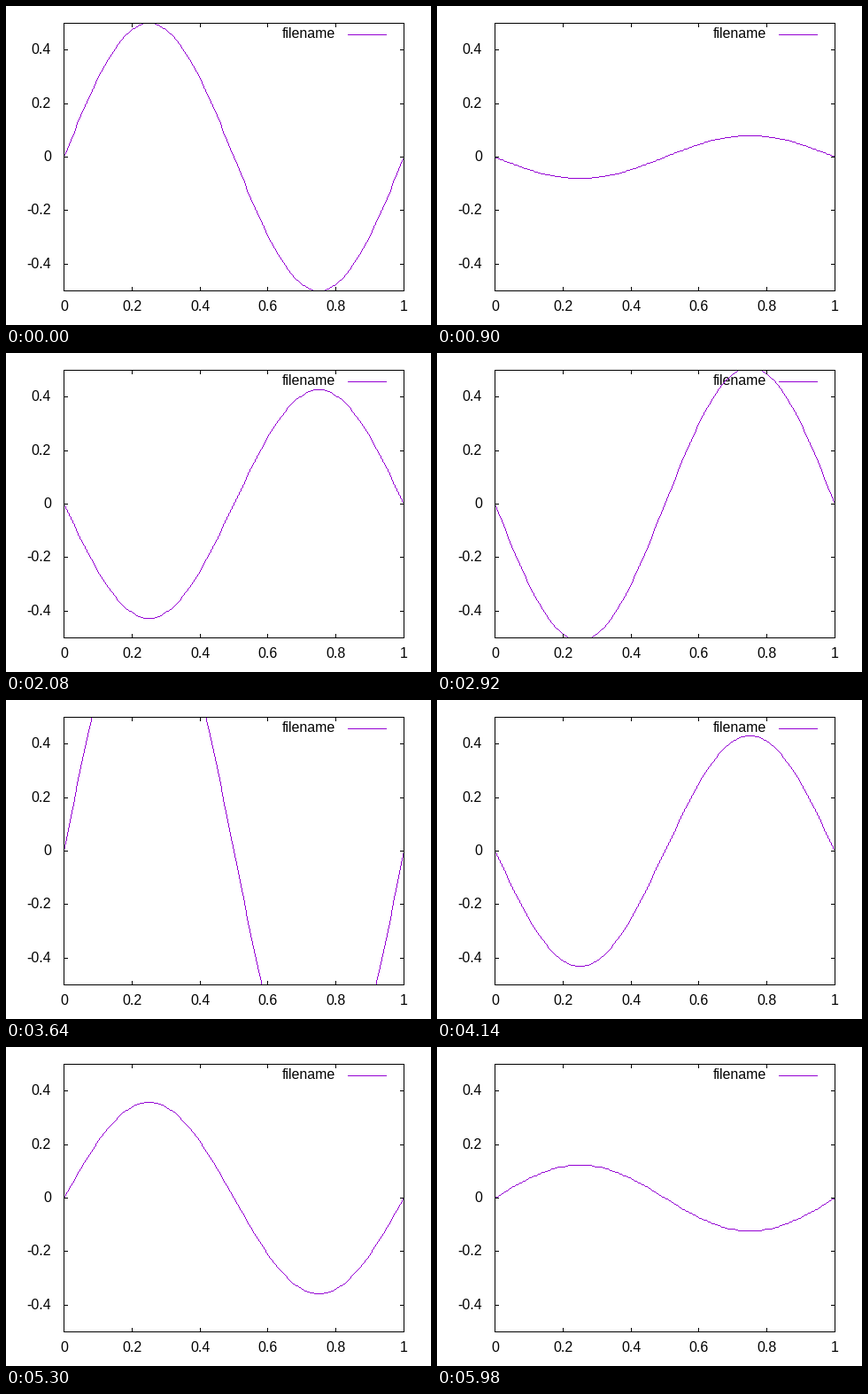
Recreate the animation shown at these times as a matplotlib script. Size 480 by 360 pixels, loop 6000 ms.

```python
import numpy as np
import matplotlib.pyplot as plt
from matplotlib.animation import FuncAnimation
from matplotlib.colors import ListedColormap
from matplotlib.patches import Rectangle

plt.rcParams.update({
    "toolbar": "None",
    "font.family": "Liberation Sans",
    "font.size": 14.4,  # 16 px at 80 dpi
    "text.hinting": "default",
})

W, H = 480, 360
LEFT, RIGHT, TOP, BOTTOM = 65, 449, 19, 321
SPAN_X, SPAN_Y = RIGHT - LEFT, BOTTOM - TOP
PURPLE = "#9400d3"
TICK = 4
FRAMES = 300
STEP = 0.1  # time step of the explicit Euler oscillator

fig = plt.figure(figsize=(W / 80, H / 80), dpi=80, facecolor="white")
ax = fig.add_axes([0, 0, 1, 1])
ax.set_axis_off()


def bar(x, y, w, h, color="black", z=3):
    ax.add_patch(Rectangle((x, y), w, h, fc=color, lw=0, aa=False, zorder=z))


def label(x, baseline, text, ha):
    ax.text(x, baseline, text, ha=ha, va="baseline", zorder=1)


def amplitude(n):
    """Euler steps of u'' = -u: each one rotates and slightly grows."""
    return 0.5 * ((1 + 1j * STEP) ** (n + 1)).real


x = np.linspace(0, 1, 101)
cols = np.rint(x * SPAN_X).astype(int)
mode = np.sin(2 * np.pi * x)


def trace(n):
    """Hard-edged one-pixel curve inside the plot box."""
    mask = np.zeros((SPAN_Y + 1, SPAN_X + 1))
    rows = np.rint((0.5 - amplitude(n) * mode) * SPAN_Y).astype(int)
    for c0, r0, c1, r1 in zip(cols, rows, cols[1:], rows[1:]):
        count = max(abs(c1 - c0), abs(r1 - r0)) + 1
        c = np.rint(np.linspace(c0, c1, count)).astype(int)
        r = np.rint(np.linspace(r0, r1, count)).astype(int)
        inside = (r >= 0) & (r <= SPAN_Y)
        mask[r[inside], c[inside]] = 1
    return mask


curve = ax.imshow(trace(0), cmap=ListedColormap([(1, 1, 1, 0), PURPLE]),
                  vmin=0, vmax=1, interpolation="nearest", aspect="auto",
                  extent=(LEFT, RIGHT + 1, BOTTOM + 1, TOP), zorder=2)
ax.set_xlim(0, W)
ax.set_ylim(H, 0)

# Border
for y in (TOP, BOTTOM):
    bar(LEFT, y, SPAN_X + 1, 1)
for edge in (LEFT, RIGHT):
    bar(edge, TOP, 1, SPAN_Y + 1)

# Ticks and their labels
for i in range(6):
    px = LEFT + round(i / 5 * SPAN_X)
    bar(px, TOP, 1, TICK + 1)
    bar(px, BOTTOM - TICK, 1, TICK + 1)
    label(px + 0.5, 344, f"{i / 5:g}", "center")
for i in range(-2, 3):
    py = TOP + round((0.5 - i / 5) * SPAN_Y)
    bar(LEFT, py, TICK + 1, 1)
    bar(RIGHT - TICK, py, TICK + 1, 1)
    label(51, py + 5, f"{i / 5:g}", "right")

# Key
label(372, 36, "filename", "right")
bar(386, 32, 44, 1, PURPLE, 2)


def update(n):
    curve.set_data(trace(n))
    return (curve,)


anim = FuncAnimation(fig, update, frames=FRAMES, interval=20, repeat=True)
plt.show()
```
